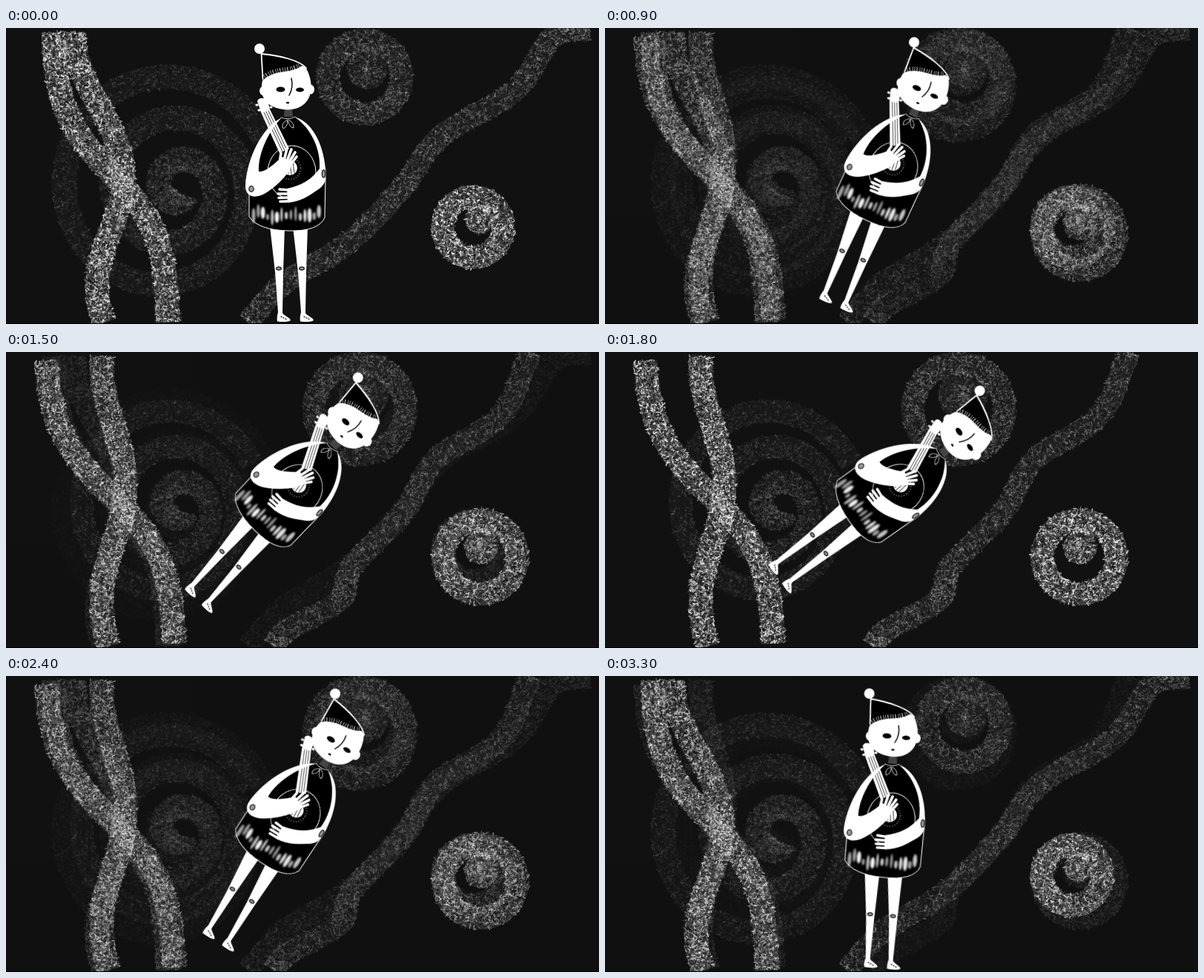
An HTML page with a canvas that plays this animation: 800x400 px, repeating every 3600 ms.

```html
<!DOCTYPE html>
<html lang="en">
<head>
<meta charset="utf-8">
<title>Lute player</title>
<style>
  html, body { margin: 0; width: 100%; height: 100%; overflow: hidden; background: #111; }
  canvas, svg { position: absolute; left: 0; top: 0; width: 800px; height: 400px; }
  #late { animation: fade 3.6s steps(6, end) infinite; }
  #figure { transform-origin: 400px 200px; animation: tilt 3.6s step-end infinite; }
  .white { fill: #fff; }
  .dark { fill: #000; }
  .line { fill: none; stroke: #fff; stroke-linecap: round; }
  .ink { fill: none; stroke: #111; stroke-linecap: round; }
  .joint { fill: #999; stroke: #222; stroke-width: 1.3; }
  @keyframes fade {
    0%, 100% { opacity: 0; }
    50% { opacity: 1; }
  }
  @keyframes tilt {
    0%, 100% { transform: rotate(0deg); }
    8.333%, 91.666% { transform: rotate(4.8deg); }
    16.666%, 83.333% { transform: rotate(14.8deg); }
    25%, 75% { transform: rotate(24deg); }
    33.333%, 66.666% { transform: rotate(32.7deg); }
    41.666%, 58.333% { transform: rotate(43deg); }
    50% { transform: rotate(54.2deg); }
  }
</style>
</head>
<body>
<canvas id="early" width="800" height="400"></canvas>
<canvas id="late" width="800" height="400"></canvas>
<svg viewBox="0 0 800 400">
  <defs><filter id="soft" x="-50%" y="-20%" width="200%" height="140%"><feGaussianBlur stdDeviation=".9"/></filter></defs>
  <g id="figure">
    <g id="leg">
      <path class="white" d="M356 268H376L374 330 373 385C375 389 383 391 384 395Q380 398 366 396.5 365 391 367 384L363 330Z"/>
      <path class="ink" stroke-width="1.3" stroke-dasharray="1 2.4" d="M371 390L379 394"/>
      <ellipse class="joint" cx="368" cy="325" rx="3.3" ry="2"/>
    </g>
    <use href="#leg" x="31"/>

    <!-- dress -->
    <path class="dark" d="M376 119C346 132 328 180 328 215V255Q340 273 381 274T430 256V200C430 160 412 124 385 119Z"/>
    <path class="line" d="M328 222V255Q340 273 381 274T430 256L431 203"/>
    <g id="streaks" class="white" filter="url(#soft)"></g>

    <!-- neck and bow -->
    <path fill="#444" d="M376 106H386L387 120H375Z"/>
    <path class="line" stroke-width=".8" d="M371 121Q380 125 390 120M380 124Q370 129 374 136 380 133 380 125 383 135 388 135 389 128 381 124"/>

    <!-- lute -->
    <ellipse class="dark" stroke="#fff" cx="385.500" cy="195" rx="32.500" ry="36"/>
    <circle cx="383" cy="190" r="14.500" fill="none" stroke="#999" stroke-width="2" stroke-dasharray=".8 2.600"/>
    <circle class="white" cx="383" cy="189" r="10"/>
    <path class="white" d="M339 99Q341 94 347 95L353 97 356 110 382 163 369 169 344 114Z"/>
    <path class="line" stroke-width="3.200" d="M338 104h1M341 111h1M355 101h2M357 107h1"/>
    <path class="ink" stroke-width=".8" d="M348 114L373 167M351 113L376 166M354 112L379 165M379 181L381 197M383 181L385 198M387 181L389 196"/>

    <!-- right arm -->
    <path class="white" d="M389 120C412 126 428 155 431 190C433 205 430 213 420 219C408 227 397 235 380 236L379 217C399 213 413 204 423 190C425 165 412 135 389 120Z"/>
    <path class="line" stroke-width="3.600" d="M382 219L369 218M381 224L367 224M381 229L368 229.500M382 234L370 234.500"/>

    <!-- left arm -->
    <path class="white" d="M372 121C344 135 325 178 323 212C322 229 337 232 352 222C365 214 374 203 382 194L386 182 372 174C360 186 349 195 341 194C340 173 351 143 372 121Z"/>
    <path class="line" stroke-width="3.600" d="M369 182L371 169M375 179L379 163M379 180L385 164M381 183L390 168M382 187L392 174"/>
    <ellipse class="joint" cx="331" cy="217.500" rx="3.200" ry="3.800"/>
    <ellipse class="joint" cx="428.500" cy="197" rx="2.200" ry="5"/>

    <!-- hat and head -->
    <path class="dark" d="M344 35C370 37 396 44 406 55L378 75 346 69Z"/>
    <path class="line" stroke-width="1.800" d="M346.500 69L344.500 35C370 37 396 44 405 54"/>
    <circle class="white" cx="342" cy="28" r="7"/>
    <ellipse class="white" cx="348" cy="85" rx="6" ry="6.500"/>
    <ellipse class="white" cx="411" cy="83" rx="5" ry="6.500"/>
    <path class="white" d="M346 71Q356 61 375 59 392 57 399 51L404 53C416 72 418 109 380 110.500 346 109 342 88 346 71Z"/>
    <path class="line" stroke-width="7" style="stroke-linecap: butt" stroke-dasharray=".6 2.400 .9 3.200 .6 2" d="M349 66Q357 59 375 57 390 55 397 50"/>
    <ellipse class="dark" cx="370.500" cy="83" rx="6" ry="3.600"/>
    <ellipse class="dark" cx="396.500" cy="83.500" rx="5.500" ry="3"/>
    <path class="ink" stroke-width="1.500" d="M385 68Q388 80 382 91"/>
    <ellipse class="dark" cx="380" cy="101" rx="2.200" ry="1.300"/>
  </g>
</svg>
<script>
  const TAU = Math.PI * 2;
  let seed = 1;

  function random() {
    seed = (seed + 0x6D2B79F5) | 0;
    let h = Math.imul(seed ^ seed >>> 15, 1 | seed);
    h = h + Math.imul(h ^ h >>> 7, 61 | h) ^ h;
    return ((h ^ h >>> 14) >>> 0) / 4294967296;
  }

  // Points of a curve given by at(t), t from 0 to 1, about 2 px apart
  function sample(at, length) {
    const n = Math.ceil(length / 2);
    return Array.from({ length: n + 1 }, (_, i) => at(i / n));
  }

  // A vertical curve x(y)
  const column = (x, top = 6, bottom = 398) => sample(t => {
    const y = top + t * (bottom - top);
    return [x(y), y];
  }, 430);

  const circle = (x, y, r) =>
    sample(t => [x + r * Math.cos(t * TAU), y + r * Math.sin(t * TAU)], r * TAU);

  // Spiral whose centre drifts to the left as it widens
  const spiral = (x, y, pitch) => sample(t => {
    const turn = 0.15 + 2.78 * t, r = pitch * turn, a = turn * TAU;
    return [x + r * (0.95 * Math.cos(a) - 0.2), y + r * Math.sin(a)];
  }, pitch * 27);

  // Catmull-Rom curve through key points
  function through(...pts) {
    const last = pts.length - 1;
    return sample(s => {
      const i = Math.min(last - 1, Math.floor(s * last)), t = s * last - i;
      const b = pts[i], c = pts[i + 1], a = pts[i - 1] || b, d = pts[i + 2] || c;
      return [0, 1].map(k => b[k] + t / 2 * (c[k] - a[k] +
        t * (2 * a[k] - 5 * b[k] + 4 * c[k] - d[k] + t * (3 * (b[k] - c[k]) + d[k] - a[k]))));
    }, 640);
  }

  // A band of chalky fibres along a curve
  function chalk(ctx, line, width, tone) {
    ctx.strokeStyle = `rgba(255,255,255,${0.2 * tone})`;
    ctx.lineWidth = width - 3;
    ctx.lineJoin = 'round';
    ctx.beginPath();
    line.forEach(p => ctx.lineTo(...p));
    ctx.stroke();
    const count = line.length * 2 * width * 0.24;
    for (let i = 0; i < count; i++) {
      const k = Math.floor(random() * (line.length - 1));
      const [x0, y0] = line[k], [x1, y1] = line[k + 1];
      const dir = Math.atan2(y1 - y0, x1 - x0), off = (random() - 0.5) * (width - 2);
      const x = x0 - Math.sin(dir) * off, y = y0 + Math.cos(dir) * off;
      const turn = random() * TAU, half = 1 + random() * 2, bend = (random() - 0.5) * 3;
      const dx = Math.cos(turn), dy = Math.sin(turn);
      ctx.strokeStyle = random() < 0.35
        ? `rgba(17,17,17,${0.65 * Math.sqrt(tone)})`
        : `rgba(255,255,255,${tone * (0.1 + 0.8 * random() ** 2)})`;
      ctx.lineWidth = 0.8 + random();
      ctx.beginPath();
      ctx.moveTo(x - dx * half, y - dy * half);
      ctx.quadraticCurveTo(x - dy * bend, y + dx * bend, x + dx * half, y + dy * half);
      ctx.stroke();
    }
  }

  // A ring with a round core inside it
  function coil(ctx, x, y, r, coreX, coreY, core, tone) {
    chalk(ctx, circle(x, y, r), 34, tone);
    chalk(ctx, circle(coreX, coreY, core / 2), core + 2, tone * 0.85);
  }

  function scene(id, paint) {
    const ctx = document.getElementById(id).getContext('2d');
    ctx.fillStyle = '#111';
    ctx.fillRect(0, 0, 800, 400);
    paint(ctx);
    ctx.fillStyle = '#000';
    ctx.fillRect(0, 399, 800, 1);
  }

  scene('early', ctx => {
    chalk(ctx, spiral(240, 220, 56), 36, 0.15);
    coil(ctx, 484, 66, 50, 487, 55, 28, 0.32);
    chalk(ctx, through([787, 2], [738, 12], [686, 85], [588, 145], [535, 215], [462, 290], [375, 345], [327, 398]), 33, 0.32);
    coil(ctx, 630, 269, 41, 639, 259, 20, 1);
    chalk(ctx, column(y => 133 + 25 * Math.cos((y - 190) / 54) + 0.09 * (y - 190)), 35, 0.95);
    chalk(ctx, column(y => 141 + 79 * Math.tanh((y - 195) / 84)), 35, 0.95);
  });

  scene('late', ctx => {
    chalk(ctx, spiral(240, 212, 48), 34, 0.15);
    coil(ctx, 477, 77, 62, 483, 58, 34, 0.32);
    chalk(ctx, through([706, 0], [668, 85], [578, 147], [538, 215], [467, 290], [450, 335], [380, 376], [362, 398]), 33, 0.32);
    coil(ctx, 640, 277, 50, 641, 264, 23, 1);
    chalk(ctx, column(y => 145 + 16 * Math.cos((y - 178) / 51)), 35, 0.95);
    chalk(ctx, column(y => 140 + 89 * Math.tanh((y - 191) / 90), 12, 394), 35, 0.95);
  });

  const streaks = document.getElementById('streaks');
  for (let i = 0; i < 15; i++) {
    const drop = document.createElementNS('http://www.w3.org/2000/svg', 'ellipse');
    const x = 334 + i * 6.3, bulge = Math.sin((x - 330) / 32);
    const shape = { cx: x, cy: 245 + 8 * random() + 6 * bulge, rx: 1.2 + 1.8 * random(),
      ry: 4 + 7 * random(), opacity: 0.6 + 0.4 * random() };
    for (const key in shape) drop.setAttribute(key, shape[key]);
    streaks.append(drop);
  }
</script>
</body>
</html>
```
